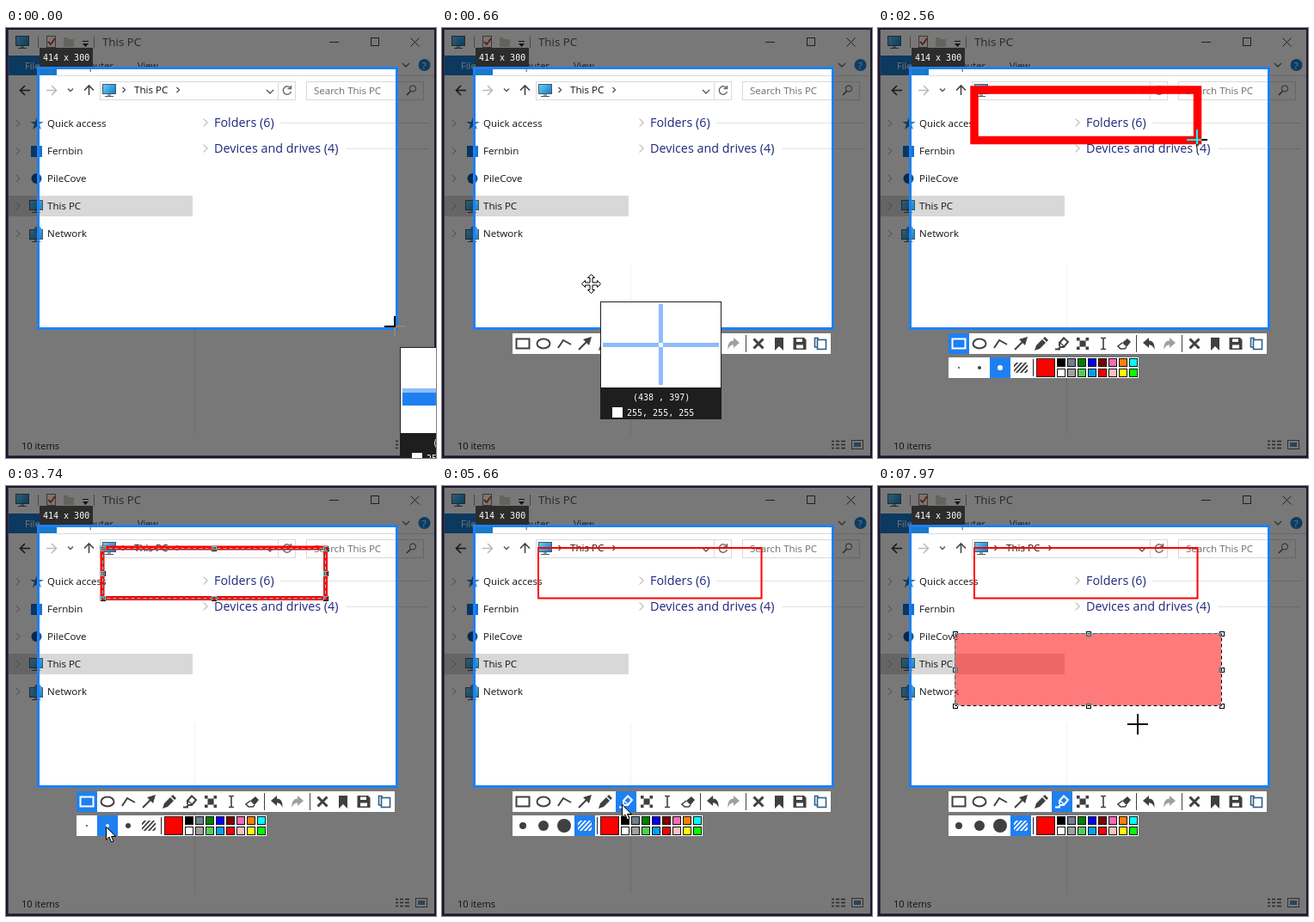
Animation of 500x500 px, one loop 8000 ms. Source, as an HTML page with a canvas:

```html
<!DOCTYPE html>
<html lang="en">
<head>
<meta charset="utf-8">
<title>Screen capture demo</title>
<style>
html, body { margin: 0; width: 100%; height: 100%; overflow: hidden; background: #787878; }
canvas { display: block; width: 500px; height: 500px; }
</style>
</head>
<body>
<canvas id="stage" width="500" height="500"></canvas>
<script>
const LOOP = 8000;
const BLUE = '#1e80f0', INK = '#404040', RED = '#ff0000';
const UI = '"Open Sans", "Noto Sans", sans-serif';
const MONO = '"DejaVu Sans Mono", monospace';
const stage = document.getElementById('stage').getContext('2d');
let g = stage;

// drawing helpers
function box(x, y, w, h, color) {
  g.fillStyle = color;
  g.fillRect(x, y, w, h);
}
function frame(x, y, w, h, color, width = 1) {
  g.strokeStyle = color;
  g.lineWidth = width;
  g.strokeRect(x, y, w, h);
}
function line(d, color, width = 1) {
  g.strokeStyle = color;
  g.lineWidth = width;
  g.stroke(new Path2D(d));
}
function shape(d, color, rule = 'nonzero') {
  g.fillStyle = color;
  g.fill(new Path2D(d), rule);
}
function dot(x, y, r, color) {
  g.fillStyle = color;
  g.beginPath();
  g.arc(x, y, r, 0, 7);
  g.fill();
}
function text(s, x, y, size, color, font = UI) {
  g.font = size + 'px ' + font;
  g.fillStyle = color;
  g.fillText(s, x, y);
}
function at(x, y, draw) {
  g.save();
  g.translate(x, y);
  draw();
  g.restore();
}

// file window
function monitor(x, y) {
  at(x, y, () => {
    const sky = g.createLinearGradient(0, 0, 14, 11);
    sky.addColorStop(0, '#6fd0f8');
    sky.addColorStop(1, '#1286cf');
    box(0, 0, 16, 12, '#4a5661');
    box(1, 1, 14, 10, sky);
    box(6, 12, 4, 2, '#9aa5ad');
    box(3, 14, 10, 1, '#4a5661');
  });
}
function chevron(x, y, color, size = 4, width = 1) {
  line(`M${x - size / 2} ${y - size}l${size} ${size}l${-size} ${size}`, color, width);
}
function caret(x, y, color, size = 4) {
  line(`M${x - size} ${y - size / 2}l${size} ${size}l${size} ${-size}`, color, 1.4);
}
function titleBar() {
  monitor(11, 9);
  box(37, 10, 1, 13, '#999');
  frame(47.5, 9.5, 10, 13, '#777');
  line('M49 16l3 3l5-7', '#e04020', 2);
  shape('M67 11h4l1 2h7v9h-12z', '#d5d2c4');
  line('M89 15.5h7', '#222');
  shape('M89 18h7l-3.5 4z', '#222');
  box(102, 10, 1, 13, '#999');
  text('This PC', 112, 21, 13.3, '#555');
  line('M376 16.5h11M470.500 11.500l10 10M480.500 11.500l-10 10', '#444');
  frame(424.5, 11.5, 9, 9, '#444');
}
function ribbon() {
  box(3, 32, 56, 23, '#1979ca');
  text('File', 22, 48, 11.2, '#fff');
  text('Computer', 73, 48, 11, '#333');
  text('View', 153, 48, 11, '#333');
  box(59, 55, 440, 1, '#dadbdc');
  caret(465, 43, '#666');
  dot(486.5, 43, 7, '#1a7fd4');
  text('?', 483.8, 47.500, 11.5, '#fff');
}
function addressBar() {
  line('M28 72.500H17M22 67l-5.500 5.500l5.500 5.500', '#333', 1.6);
  line('M47 72.500H58M53 67l5.500 5.500l-5.500 5.500', '#bbb', 1.6);
  caret(75, 72, '#555', 3);
  line('M96.500 78V67M91 72.500l5.500-5.500l5.500 5.500', '#444', 1.6);
  frame(109.5, 62.5, 227, 21, '#d9d9d9');
  monitor(112, 65);
  chevron(137, 72, '#555', 3, 1.4);
  text('This PC', 149, 76, 11.6, '#111');
  chevron(200, 72, '#555', 3, 1.4);
  caret(307, 74, '#555', 4);
  box(316, 63, 1, 20, '#d9d9d9');
  line('M331 70a4.700 4.700 0 1 0 .5 4M331.500 67v3.500h-4', '#666', 1.4);
  frame(349.5, 62.5, 136, 21, '#d9d9d9');
  text('Search This PC', 358, 77, 11.5, '#6d6d6d');
  g.beginPath();
  g.arc(473, 70.500, 3.600, 0, 7);
  g.strokeStyle = '#555';
  g.stroke();
  line('M470.500 73.500l-4.500 4.500', '#555', 1.6);
}
function sidebar() {
  box(3, 195, 214, 24, '#d8d8d8');
  ['Quick access', 'Fernbin', 'PileCove', 'This PC', 'Network'].forEach((name, i) => {
    chevron(14, 111 + 32 * i, '#999');
    text(name, 48, 115 + 32 * i, 11.55, '#111');
  });
  shape('M36 104l2 5h6l-5 3l2 6l-5-3.500l-5 3.500l2-6l-5-3h6z', '#2f7fc8');
  box(29, 137, 13, 13, '#1273dc');
  dot(35.5, 175, 6, '#0f55a8');
  monitor(27, 200);
  monitor(27, 234);
  dot(37, 235, 4.5, '#3c9be0');
}
function content() {
  [['Folders (6)', 110, 319], ['Devices and drives (4)', 140, 395]].forEach(([name, y, x]) => {
    chevron(232, y, '#999', 4.5);
    text(name, 242, y + 5, 14.35, '#1e287c');
    box(x, y, 492 - x, 1, '#e2e2e2');
  });
  box(219, 352, 1, 121, '#e6e6e6');
  text('10 items', 18, 490, 11.1, '#222');
  for (let y = 480; y < 491; y += 4) {
    line(`M453 ${y + .5}h3M458 ${y + .5}h4M464 ${y + .5}h5`, '#555', 1.5);
  }
  frame(476.5, 479.5, 13, 10, '#666');
  box(479, 482, 8, 5, '#5c8fb8');
}
function capture() {
  box(0, 0, 500, 500, '#fff');
  titleBar();
  ribbon();
  addressBar();
  sidebar();
  content();
  const dim = 'rgba(0,0,0,.53)';
  box(0, 0, 500, 48, dim);
  box(0, 348, 500, 152, dim);
  box(0, 48, 39, 300, dim);
  box(453, 48, 47, 300, dim);
  frame(1, 1, 498, 498, '#1d1630', 2);
  box(2, 2, 1, 496, '#3a3448');
  box(2, 497, 496, 1, '#3a3448');
  frame(37.5, 46.5, 417, 303, BLUE, 3);
  box(39, 23, 62, 22, '#2c2c2c');
  text('414 x 300', 43, 38, 10, '#fff', MONO);
}
function cached(draw) {
  const layer = document.createElement('canvas');
  layer.width = layer.height = 500;
  g = layer.getContext('2d');
  draw();
  g = stage;
  return layer;
}

// toolbar icons, drawn around their centre
const undo = c => shape('M-7-1L0-7V-3.500C5-3.500 7 1 6.500 7C5 3 3 1.500 0 1.500V5Z', c);
const icons = {
  rect: c => frame(-7.5, -5.5, 15, 11, c, 2),
  oval: c => {
    g.beginPath();
    g.ellipse(0, 0, 7.5, 5.5, 0, 0, 7);
    g.strokeStyle = c;
    g.lineWidth = 2;
    g.stroke();
  },
  bend: c => line('M-7 5L-1-4L8 1', c, 2),
  arrow: c => { line('M-7 7L3-3', c, 2); shape('M8-8L5 2L-2-5Z', c); },
  pencil: c => { shape('M-8 8L-6 2L1-5L5-1L-2 6Z', c); shape('M2-6L4-8L8-4L6-2Z', c); },
  marker: c => {
    line('M-3 3L-3-1L2-6.500L7-2L2 4H-2L-4 6', c, 2);
    line('M-8 6.500H-2', c, 2);
    line('M-2-1L2 3', c, 1.3);
  },
  mosaic: c => {
    for (let i = 0; i < 16; i++) {
      const col = i % 4, row = i >> 2;
      if (col === row || col + row === 3) box(col * 3.5 - 7, row * 3.5 - 7, 3.6, 3.6, c);
    }
  },
  type: c => line('M-3-6.500H-1L0-5.500L1-6.500H3M0-6V6M-3 6.500H-1L0 5.500L1 6.500H3', c, 1.6),
  eraser: c => {
    shape('M-2-1L4-6L8-2L3 4Z', c);
    line('M-2-1L-7 3L-4 6H1L3 4', c, 1.6);
  },
  undo,
  redo: c => { g.scale(-1, 1); undo(c); },
  close: c => line('M-5.500-5.500L5.500 5.500M5.500-5.500L-5.500 5.500', c, 3),
  pin: c => shape('M-5-7H5V8L0 3L-5 8Z', c),
  save: c => shape('M-7.500-7H5L7.500-4.500V7H-7.500ZM-4-5.500V-2H3V-5.500ZM-4 1.500V5.500H4V1.500Z', c, 'evenodd'),
  copy: c => {
    line('M-3-4V-6.500H-6.500V4H-4', c, 1.6);
    frame(-3.5, -4.5, 10, 11, c, 1.6);
  },
};
const slots = Object.keys(icons);
function slotX(i) {
  return i < 9 ? 94 + 24 * i : i < 11 ? 315 + 24 * (i - 9) : 368 + 24 * (i - 11);
}
function toolbar(active, canUndo) {
  box(82, 355, 370, 24, '#fff');
  box(300, 357, 1, 20, INK);
  box(353, 357, 1, 20, INK);
  slots.forEach((name, i) => {
    const on = name === active, x = slotX(i);
    if (on) box(x - 12, 355, 24, 24, BLUE);
    const off = name === 'redo' || name === 'undo' && !canUndo;
    const color = on ? '#fff' : off ? '#a0a0a0' : name === 'copy' ? '#2d5f8c' : INK;
    at(x, 367, () => icons[name](color));
  });
}
const PALETTE = ['#000', '#708090', '#008000', '#00f', '#800000', '#ff69b4', '#ff8000', '#0ff',
  '#fff', '#a0a0a0', '#50d050', '#00a0f0', '#f00', '#ffc0c0', '#ff0', '#0f0'];
function options(sizes, active) {
  box(82, 383, 221, 24, '#fff');
  box(82 + 24 * active, 383, 24, 24, BLUE);
  const tone = i => i === active ? '#fff' : INK;
  sizes.forEach((r, i) => dot(94 + 24 * i, 395, r, tone(i)));
  g.save();
  g.beginPath();
  g.rect(158, 389, 16, 12);
  g.clip();
  for (let i = 0; i < 7; i++) line(`M${150 + 5 * i} 402l13-14`, tone(3), 1.8);
  g.restore();
  box(180, 385, 1, 20, '#222');
  box(183, 383, 120, 24, '#fff');
  box(184, 384, 22, 22, '#222');
  box(185, 385, 20, 20, RED);
  PALETTE.forEach((color, i) => {
    const x = 208 + 12 * (i % 8), y = i < 8 ? 384 : 396;
    box(x, y, 10, 10, '#111');
    box(x + 1, y + 1, 8, 8, color);
  });
}

// pointers
function inverted(draw) {
  g.save();
  g.globalCompositeOperation = 'difference';
  draw();
  g.restore();
}
function cross(x, y) {
  inverted(() => {
    g.fillStyle = '#fff';
    g.beginPath();
    g.rect(x - 1, y - 12, 2, 24);
    g.rect(x - 12, y - 1, 24, 2);
    g.fill();
  });
}
function outlined(d) {
  shape(d, '#fff');
  line(d, '#000');
}
const POINTER = 'M.5.5V15.500L4 12L6.500 18L9 17L6.500 11.500H11.500Z';
const MOVER = 'M0-11L4-7H1.500V-1.500H7V-4L11 0L7 4V1.500H1.500V7H4L0 11' +
  'L-4 7H-1.500V1.500H-7V4L-11 0L-7-4V-1.500H-1.500V-7H-4Z';

function magnifier(x, y, px, py, onEdge) {
  at(x, y, () => {
    box(0, 0, 141, 137, '#1e1e1e');
    box(1, 1, 139, 99, '#fff');
    if (onEdge) box(3, 53, 137, 15, BLUE);
    box(3, 48, 135, 5, '#8ebcfa');
    box(68, 3, 5, 94, '#8ebcfa');
    box(68, 48, 5, 5, '#fff');
    text(`(${px} , ${py})`, 38, 115, 10, '#fff', MONO);
    box(14, 123, 12, 12, '#fff');
    text('255, 255, 255', 31, 133, 10, '#fff', MONO);
  });
}

// dashed outline with eight grips
function grips(x, y, w, h) {
  inverted(() => {
    g.setLineDash([4, 3]);
    frame(x, y, w, h, '#fff');
    g.setLineDash([]);
    for (let i = 0; i < 9; i++) {
      if (i === 4) continue;
      const gx = Math.round(x + w * (i % 3) / 2), gy = Math.round(y + h * (i / 3 | 0) / 2);
      frame(gx - 2.5, gy - 2.5, 5, 5, '#fff');
    }
  });
}

const bursts = [[0, 1], [120, 8], [1200, 1], [1480, 8], [2560, 5], [3220, 1], [3340, 1], [3740, 3],
  [4290, 1], [4570, 6], [5660, 1], [5780, 6], [6620, 1], [6740, 8], [7820, 2]];
const ticks = bursts.flatMap(([start, n]) =>
  Array.from({ length: n }, (_, i) => start + 135 * i + (i % 2 ? 15 : 0)));

// pointer path: time, x, y
const path = [
  [0, 452, 347], [120, 440, 343], [390, 300, 316], [660, 173, 297], [810, 138, 325],
  [930, 112, 355], [1080, 103, 360], [1200, 99, 363], [1480, 101.5, 338.5], [1630, 103, 300],
  [1900, 111, 90], [2020, 112, 72], [2170, 150, 81], [2440, 357, 127], [2560, 371, 130],
  [2710, 352, 170], [2980, 190, 345], [3100, 140, 385], [3340, 116, 396], [3740, 116, 396],
  [4010, 99, 397], [4290, 99, 397], [4570, 104, 395], [5110, 214, 355], [5260, 209, 370],
  [5660, 209, 370], [5930, 172, 300], [6200, 104, 195], [6470, 90, 173], [6620, 89, 171],
  [6740, 120, 179], [7010, 296, 227], [7160, 352, 242], [7700, 399, 255], [7970, 302, 277],
];
function pointerAt(t) {
  const i = path.findIndex(k => k[0] >= t);
  if (i <= 0) return path[i < 0 ? path.length - 1 : 0].slice(1);
  const [t0, x0, y0] = path[i - 1], [t1, x1, y1] = path[i];
  const p = (t - t0) / (t1 - t0);
  return [Math.round(x0 + (x1 - x0) * p), Math.round(y0 + (y1 - y0) * p)];
}

function redBox(t, x, y) {
  if (t < 2170) return;
  const done = t >= 2560;
  const w = done ? 260 : x - 112, h = done ? 58 : y - 72;
  frame(112, 72, w - .5, h + .5, RED, t < 3740 ? 9.5 : t < 4290 ? 5 : 2);
  if (t >= 2710 && t < 5660) grips(112.5, 72.5, w - 1, h);
}
function highlight(t, x, y) {
  if (t < 6740) return;
  const done = t >= 7700;
  const w = done ? 310 : x - 89, h = done ? 84 : y - 171;
  box(89, 171, w, h, 'rgba(255,0,0,.52)');
  if (t >= 7820) grips(89.5, 171.5, w, h);
}
function pointer(t, x, y) {
  if (t > 0 && t < 930) {
    at(x + .5, y + .5, () => outlined(MOVER));
  } else if (t > 0 && y >= 354) {
    at(x, y, () => outlined(POINTER));
  } else {
    cross(x, y);
  }
}

const backdrop = cached(capture);

function render(time) {
  const t = ticks.filter(s => s <= time).pop();
  const [x, y] = pointerAt(t);
  g.drawImage(backdrop, 0, 0);
  if (t >= 120) box(219, 275, 1, 73, '#f3f3f3');
  redBox(t, x, y);
  highlight(t, x, y);
  if (t >= 120) toolbar(t < 1480 ? '' : t < 5660 ? 'rect' : 'marker', t >= 2560);
  if (t >= 5660) options([4, 6, 8], 3);
  else if (t >= 1480) options([1, 2, 3], t < 3740 ? 2 : t < 4290 ? 1 : 0);
  if (t < 930) {
    const start = t === 0;
    magnifier(x + (start ? 6 : 11), y + (start ? 24 : 21), x + 265, y + 100, start);
  }
  pointer(t, x, y);
}

const begin = performance.now();
function loop() {
  render((performance.now() - begin) % LOOP);
  requestAnimationFrame(loop);
}
loop();
</script>
</body>
</html>
```
